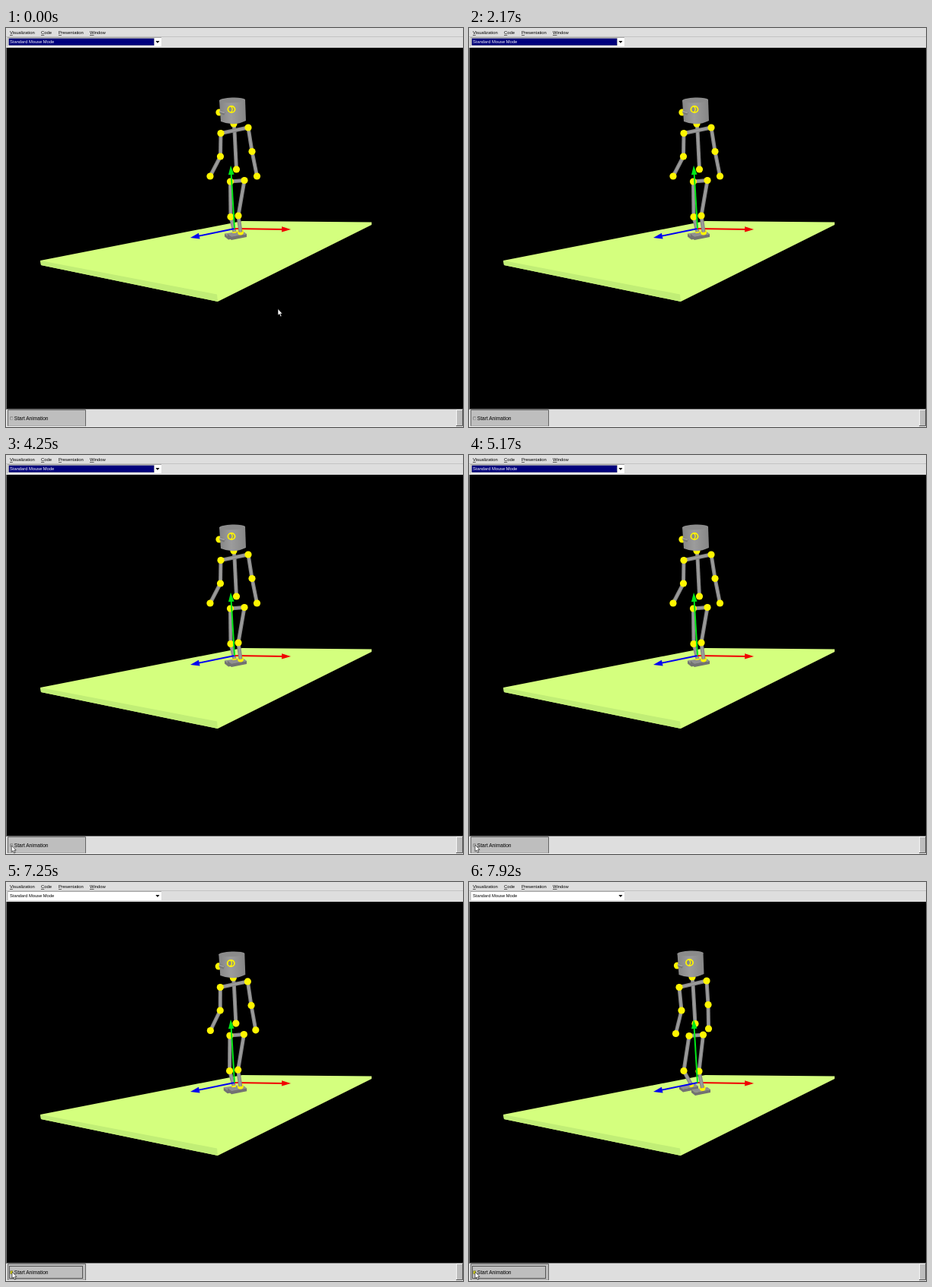
An HTML page for the animation above (8 s loop, 600x525 px).

```html
<!DOCTYPE html>
<html lang="en">
<head>
<meta charset="utf-8">
<title>Robot viewer</title>
<style>
  html, body { margin: 0; width: 600px; height: 525px; overflow: hidden; background: #000; }
  svg { display: block; }
  text { font-family: "Liberation Sans", Arial, sans-serif; font-size: 5.85px; fill: #000; }
  .u { text-decoration: underline; }
  .pick { fill: #00007c; stroke: #b8b878; stroke-width: .6; stroke-dasharray: 1 1; }
  .on .pick, .focus { display: none; }
  .on .focus { display: inline; }
  .combo { fill: #fff; }
  .on .combo { fill: #000; }
  .on #tick { fill: #f4f000; stroke: #8c8c30; }
</style>
</head>
<body>
<svg id="stage" width="600" height="525" viewBox="0 0 600 525">
  <defs>
    <linearGradient id="steel">
      <stop offset="0" stop-color="#858585"/>
      <stop offset=".45" stop-color="#9c9c9c"/>
      <stop offset="1" stop-color="#868686"/>
    </linearGradient>
  </defs>

  <!-- window -->
  <rect width="600" height="525" fill="#dedede"/>
  <path d="M0 11.5H600" stroke="#c4c4c4"/>
  <rect y="26" width="600" height="475" fill="#000"/>
  <path d="M.5 26V501" stroke="#777"/>
  <g id="menu"></g>
  <rect x="2" y="13" width="202" height="11" fill="#fff"/>
  <path d="M2 24V12.5H204" fill="none" stroke="#999" stroke-width=".8"/>
  <rect class="pick" x="3.5" y="13.5" width="191" height="9.5"/>
  <text class="combo" x="5" y="20.4" style="font-size:5.75px">Standard Mouse Mode</text>
  <path d="M196.5 17H201.5L199 20Z"/>

  <!-- floor -->
  <path d="M45 306L310 254L480 255.5V259L278 360L46 312Z" fill="#d4ff7e"/>
  <path d="M45 306L277 350.5L278 360L46 312Z" fill="#c1ee76"/>

  <g id="robot"></g>

  <!-- bottom bar -->
  <rect y="501" width="600" height="24" fill="#dedede"/>
  <path d="M0 501.5H600" stroke="#777"/>
  <rect x="2" y="502.5" width="102.5" height="21.5" fill="#bebebe"/>
  <path d="M2.5 524V502.5H104.5V524" fill="none" stroke="#666"/>
  <path d="M2 524H104.5" stroke="#999"/>
  <rect class="focus" x="4.5" y="505.5" width="96" height="16" fill="none" stroke="#555"/>
  <path d="M591.5 524V502.5H599.5" fill="none" stroke="#f4f4f4"/>
  <rect x="592" y="503" width="7" height="20" fill="#bdbdbd"/>
  <path d="M599.5 502V523.5H591" fill="none" stroke="#555"/>
  <path d="M0 524.5H600" stroke="#eee"/>
  <rect id="tick" x="5.8" y="511.8" width="3" height="3.6" fill="#c8c8c8" stroke="#999" stroke-width=".7"/>
  <path d="M5.8 515.5V511.8H8.8" fill="none" stroke="#777" stroke-width=".6"/>
  <text x="10.8" y="515.8" style="font-size:6.6px">Start Animation</text>

  <!-- pointers -->
  <path id="arrow" d="M0 0V8.6L2 6.9L3.4 10.2L4.9 9.5L3.5 6.4H6Z" fill="#fff" stroke="#000" stroke-width=".6"/>
  <g id="sizer">
    <path d="M19 501V510M16.8 503L19 500.4L21.2 503M16.8 508L19 510.6L21.2 508" fill="none" stroke="#fff" stroke-width="2"/>
    <path d="M19 501.5V509.5M17.2 508.2L19 510L20.8 508.2" fill="none" stroke="#222" stroke-width=".8"/>
  </g>
</svg>

<script>
const LOOP = 8000, FPS = 12, CLICK = 86, WALK = 9;
const $ = id => document.getElementById(id);
const lerp = (a, b, k) => a + (b - a) * k;

// Each joint: x, y at rest, then x, y at the end of the walk.
const JOINTS = {
  head: [297, 95, 290.5, 94], neck: [299, 126, 293, 125],
  shoulderL: [282, 138.5, 276, 138.5], shoulderR: [318, 131, 312, 130],
  elbowL: [281.5, 169, 279, 169], elbowR: [323, 162.5, 314, 161.5],
  handL: [268, 195, 271.5, 199.5], handR: [329.5, 195, 314.5, 193],
  pelvis: [302.5, 186, 297, 186.5],
  hipL: [294.5, 202, 289, 202.5], hipR: [313, 200.5, 307.5, 201],
  kneeL: [295, 248.5, 282, 248.5], kneeR: [305, 247, 302, 249],
  ankleL: [300, 268, 292, 267], ankleR: [308, 268.5, 306.5, 271],
  footL: [299, 272.5, 288, 270.5], footR: [303, 273, 304, 275]
};

function limb([x1, y1], [x2, y2]) {
  const d = `M${x1} ${y1}L${x2} ${y2}`;
  return `<path d="${d}" stroke="#858585" stroke-width="5"/><path d="${d}" stroke="#9b9b9b" stroke-width="2.6"/>`;
}

const ball = ([x, y], r = 4.6) => `<circle cx="${x}" cy="${y}" r="${r}" fill="#fff600"/>`;

function foot([x, y]) {
  return `<path d="M${x - 12} ${y - 2}L${x + 9} ${y - 5}L${x + 13} ${y - 2}L${x - 7} ${y + 2}Z" fill="#909090"/>
    <path d="M${x - 12} ${y - 2}L${x - 7} ${y + 2}L${x + 13} ${y - 2}V${y + 2}L${x - 7} ${y + 6}L${x - 12} ${y + 2}Z" fill="#727272"/>`;
}

function axis(x, y, color, size) {
  const a = Math.atan2(y - 264, x - 300) * 180 / Math.PI;
  const len = Math.hypot(x - 300, y - 264);
  return `<g transform="translate(300 264) rotate(${a})" fill="${color}">
    <rect y="-1" width="${len - 8}" height="2"/>
    <path d="M${len} 0L${len - 12} ${-size}V${size}Z"/></g>`;
}

function head([x, y]) {
  return `<g transform="translate(${x} ${y})">
    <circle cx="-17" cy="16" r="4.6" fill="#fff600"/>
    <path d="M-17 0L-15 28Q2 35 18 27L17 -1Z" fill="url(#steel)"/>
    <ellipse rx="17" ry="3.4" fill="#8b8b8b" transform="rotate(-2)"/>
    <path d="M-16 15L-10 18" stroke="#777" stroke-width="4"/>
    <path d="M-17 14.5L-10 16.5" stroke="#a5a5a5" stroke-width="1.4"/>
    <ellipse cx="-1" cy="12" rx="4.6" ry="4.1" fill="#8a8a8a" stroke="#fff600" stroke-width="1.8"/>
    <path d="M-1.5 8.2Q2 12 -1.5 15.6" fill="none" stroke="#fff600" stroke-width="1.3"/></g>`;
}

function robot(k) {
  const j = {};
  for (const name in JOINTS) {
    const [x, y, u, v] = JOINTS[name];
    j[name] = [lerp(x, u, k), lerp(y, v, k)];
  }
  const chest = [lerp(j.shoulderL[0], j.shoulderR[0], .5), lerp(j.shoulderL[1], j.shoulderR[1], .5)];
  return foot(j.footL) + ball(j.ankleL, 3) + limb(j.kneeL, j.ankleL) + limb(j.hipL, j.kneeL)
    + axis(374, 265, "#f00000", 3.6) + axis(242, 276, "#0000f0", 4)
    + foot(j.footR) + ball(j.ankleR, 4) + limb(j.kneeR, j.ankleR)
    + limb(j.neck, chest) + limb(chest, j.pelvis) + limb(j.shoulderL, j.shoulderR)
    + limb(j.hipL, j.hipR) + limb(j.hipR, j.kneeR)
    + limb(j.shoulderL, j.elbowL) + limb(j.elbowL, j.handL)
    + limb(j.shoulderR, j.elbowR) + limb(j.elbowR, j.handR)
    + ["shoulderL", "shoulderR", "elbowL", "elbowR", "handL", "handR", "pelvis", "hipL", "hipR", "kneeL", "kneeR", "neck"]
      .map(n => ball(j[n])).join("")
    + axis(295, 181, "#00e818", 3.8) + head(j.head);
}

// Arrow waypoints: step, x, y.
const PATH = [[0, 357, 369.5], [1, 357, 374], [3, 357, 383], [42, 19, 506], [46, 6, 514], [54, 8, 513.5], [60, 8, 513]];

function pointer(step) {
  const i = PATH.findIndex(p => p[0] > step);
  if (i < 0) return PATH[PATH.length - 1].slice(1);
  const a = PATH[i - 1], b = PATH[i], k = (step - a[0]) / (b[0] - a[0]);
  // Rests on the floor view until it leaves the window.
  if (a[0] === 3) return a.slice(1);
  return [lerp(a[1], b[1], k), lerp(a[2], b[2], k)];
}

$("menu").innerHTML = [["Visualization", 5], ["Code", 46], ["Presentation", 69], ["Window", 110]]
  .map(([s, x]) => `<text x="${x}" y="8"><tspan class="u">${s[0]}</tspan>${s.slice(1)}</text>`).join("");

let last = -1;
function draw(now) {
  const step = Math.floor((now % LOOP) * FPS / 1000 + .05);
  if (step !== last) {
    last = step;
    $("stage").classList.toggle("on", step >= CLICK);
    $("robot").innerHTML = robot(Math.min(1, Math.max(0, (step - CLICK) / WALK)));
    $("arrow").setAttribute("transform", `translate(${pointer(step).join(" ")})`);
    $("arrow").style.display = step < 11 || step >= 42 ? "" : "none";
    $("sizer").style.display = step >= 38 && step < 42 ? "" : "none";
  }
  requestAnimationFrame(draw);
}
draw(performance.now());
</script>
</body>
</html>
```
